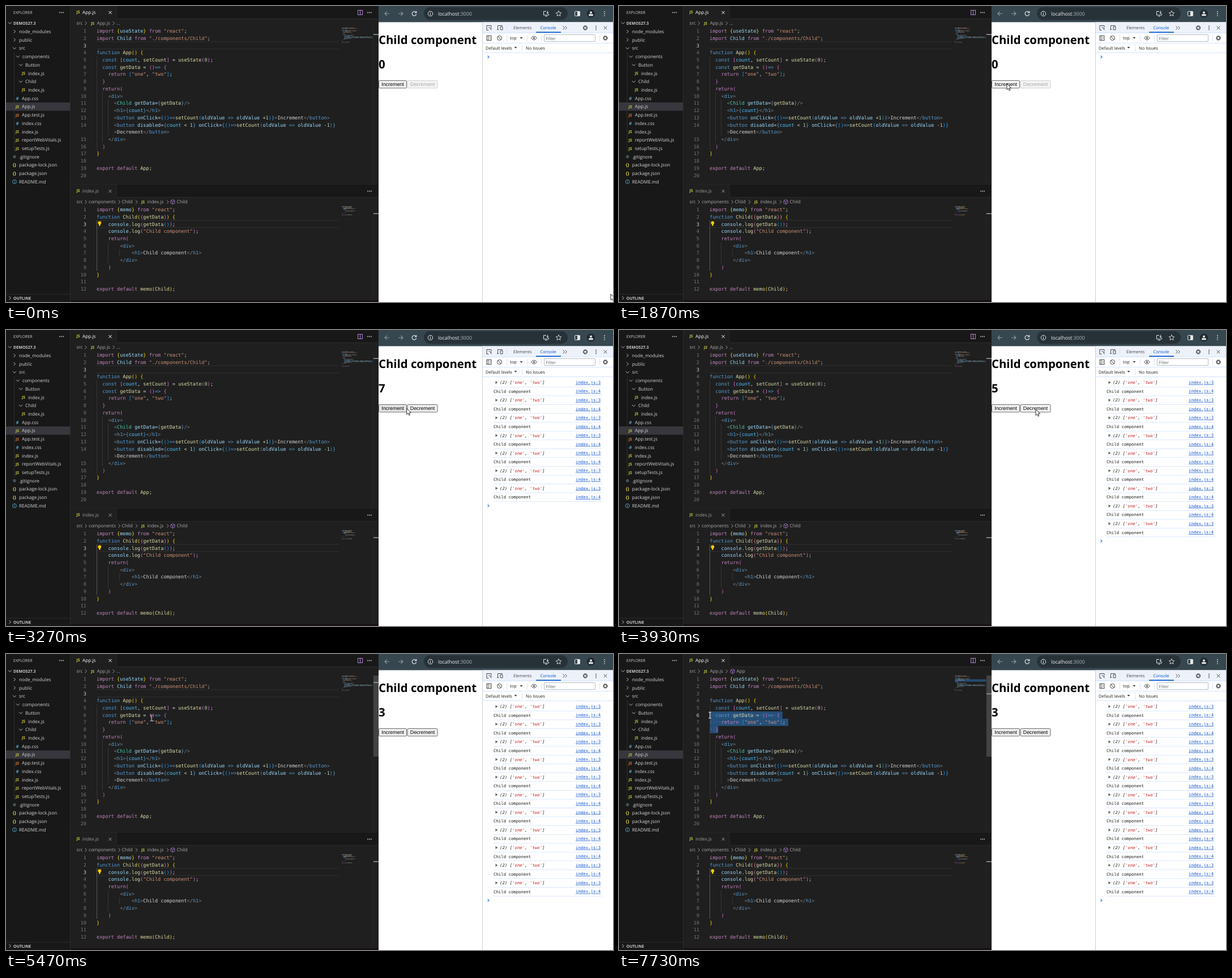
An HTML page that plays this animation: 1072x522 px, repeating every 8 s.

```html
<!DOCTYPE html>
<html lang="en">
<head>
<meta charset="utf-8">
<title>Editor and browser</title>
<style>
html, body { margin: 0; width: 100%; height: 100%; overflow: hidden; background: #1f1f1f; }
svg { display: block; width: 1072px; height: 522px; text-rendering: geometricPrecision; }
text { white-space: pre; font-family: "Open Sans", "Noto Sans", sans-serif; }
.mono { font-family: "DejaVu Sans Mono", "Noto Sans Mono", monospace; }
.arial { font-family: "Liberation Sans", sans-serif; }
</style>
</head>
<body>
<svg id="stage" viewBox="0 0 1072 522" xmlns="http://www.w3.org/2000/svg"></svg>
<script>
const LOOP = 8000, CHAR = 5.148, LEAD = 12.73, CODE_X = 160;
const TOP = 44, BOTTOM = 359;
const COLORS = { p: '#c586c0', b: '#569cd6', v: '#9cdcfe', f: '#dcdcaa', s: '#ce9178', t: '#4ec9b0',
  n: '#b5cea8', g: '#808080', w: '#d4d4d4', c: '#4fc1ff', 1: '#ffd700', 2: '#da70d6', 3: '#179fff' };

// Each segment between "~" starts with its colour key.
const appCode = [
  'pimport ~1{~vuseState~1}~p from ~s"react"~w;',
  'pimport ~vChild~p from ~s"./components/Child"~w;',
  '',
  'bfunction ~fApp~1() {',
  'b  const ~2[~ccount~w, ~fsetCount~2]~w = ~fuseState~2(~n0~2)~w;',
  'b  const ~fgetData~w = ~2()~b=>~2 {',
  'p    return ~3[~s"one"~w, ~s"two"~3]~w;',
  '2  }',
  'p  return~2(',
  'g    <~bdiv~g>',
  'g      <~tChild~v getData~w=~b{~fgetData~b}~g/>',
  'g      <~bh1~g>~b{~ccount~b}~g</~bh1~g>',
  'g      <~bbutton~v onClick~w=~b{~3()~b=>~fsetCount~3(~voldValue~b => ~voldValue ~w+~n1~3)~b}~g>~wIncrement~g</~bbutton~g>',
  'g      <~bbutton~v disabled~w=~b{~ccount~w < ~n1~b}~v onClick~w=~b{~3()~b=>~fsetCount~3(~voldValue~b => ~voldValue ~w-~n1~3)~b}',
  'g      >~wDecrement~g</~bbutton~g>',
  'g    </~bdiv~g>',
  '2  )',
  '1}',
  '',
  'pexport default ~fApp~w;',
  ''
];
const childCode = [
  'pimport ~1{~vmemo~1}~p from ~s"react"~w;',
  'bfunction ~fChild~1(~2{~fgetData~2}~1) {',
  'v    console~w.~flog~2(~fgetData~3()~2)~w;',
  'v    console~w.~flog~2(~s"Child component"~2)~w;',
  'p    return~2(',
  'g        <~bdiv~g>',
  'g            <~bh1~g>~wChild component~g</~bh1~g>',
  'g        </~bdiv~g>',
  '2    )',
  '1}',
  '',
  'pexport default ~fmemo~1(~fChild~1)~w;'
];
const files = [
  ['>', 15, 'node_modules'], ['>', 15, 'public'], ['v', 15, 'src'], ['v', 21, 'components'],
  ['v', 26, 'Button'], ['JS', 31, 'index.js'], ['v', 26, 'Child'], ['JS', 31, 'index.js'],
  ['#', 20, 'App.css'], ['JS', 20, 'App.js'], ['JS', 20, 'App.test.js', '#e37933'], ['#', 20, 'index.css'],
  ['JS', 20, 'index.js'], ['JS', 20, 'reportWebVitals.js'], ['JS', 20, 'setupTests.js'],
  ['o', 15, '.gitignore'], ['{}', 15, 'package-lock.json'], ['{}', 15, 'package.json'], ['i', 15, 'README.md']
];

const esc = s => s.replace(/&/g, '&amp;').replace(/</g, '&lt;');
const rect = (x, y, w, h, fill, more = '') => `<rect x="${x}" y="${y}" width="${w}" height="${h}" fill="${fill}" ${more}/>`;
const line = (d, stroke, width = 1, more = '') => `<path d="${d}" fill="none" stroke="${stroke}" stroke-width="${width}" ${more}/>`;
const circle = (x, y, r, fill, more = '') => `<circle cx="${x}" cy="${y}" r="${r}" fill="${fill}" ${more}/>`;
const text = (x, y, s, fill, size = 8.2, more = '') =>
  `<text x="${x}" y="${(y + size * .36).toFixed(2)}" fill="${fill}" font-size="${size}" ${more}>${esc(s)}</text>`;
const code = (x, y, s, fill, more = '') => text(x, y, s, fill, 8.55, 'class="mono" ' + more);
const log = (x, y, s, fill, more = '') => text(x, y, s, fill, 7.33, 'class="mono" ' + more);
const chevron = (x, y, open, color = '#ccc') =>
  line(open ? `M${x - 3} ${y - 1.5}l3 3 3-3` : `M${x - 1.5} ${y - 3}l3 3-3 3`, color, .9);
const cross = (x, y, color, r = 2.6) => line(`M${x - r} ${y - r}l${2 * r} ${2 * r}m0 ${-2 * r}l${-2 * r} ${2 * r}`, color, 1);
const dots = (x, y, color, dx, dy) => [-1, 0, 1].map(k => circle(x + k * dx, y + k * dy, .9, color)).join('');
const js = (x, y, color = '#cbcb41') => text(x, y, 'JS', color, 6.8, 'font-weight="700" text-anchor="middle"');
const cube = (x, y) => line(`M${x} ${y - 4}l3.5 1.8v4.2l-3.5 2-3.5-2v-4.2zM${x - 3.5} ${y - 2.2}l3.5 1.9 3.5-1.9M${x} ${y - .3}v4.2`, '#b180d7', .8);
const gear = (x, y) => circle(x, y, 3.4, 'none', 'stroke="#45474a" stroke-width="1.6" stroke-dasharray="1.9 .77"') +
  circle(x, y, 2.4, 'none', 'stroke="#45474a"');
const rowY = (top, row) => top + row * LEAD;
const plain = src => src.split('~').map(s => s.slice(1)).join('');

function codeBlock(lines, top, mapTop) {
  let out = '', map = '';
  lines.forEach((src, row) => {
    let col = 0;
    for (const seg of src.split('~')) {
      const color = COLORS[seg[0]], s = seg.slice(1);
      out += s.trim() && code(CODE_X + col * CHAR, rowY(top, row), s, color);
      for (const m of s.matchAll(/\S+/g))
        map += rect(593 + (col + m.index) * .67, mapTop + row * 1.34, m[0].length * .67, .9, color);
      col += s.length;
    }
  });
  return out + `<g opacity=".5">${map}</g>`;
}

function lineNumbers(count, top, active, wrapAfter) {
  let out = '';
  for (let n = 1; n <= count; n++)
    out += code(142, rowY(top, n - 1 + (n > wrapAfter)), String(n), n === active ? '#ccc' : '#6e7681', 'text-anchor="end"');
  return out;
}

const guide = (x, top, from, to, color = '#404040') =>
  line(`M${x + .5} ${rowY(top, from - .5)}V${rowY(top, to + .5)}`, color, .7);
const lineBox = (top, row) =>
  line(`M160 ${rowY(top, row - .5)}H588M160 ${rowY(top, row + .5)}H588`, '#303031', 1);

function fileIcon(kind, x, y, color) {
  if (kind === '>' || kind === 'v') return chevron(x, y, kind === 'v');
  if (kind === 'JS') return js(x, y, color);
  if (kind === 'o') return circle(x, y, 2.8, '#41535b');
  if (kind === 'i') return circle(x, y, 3.5, 'none', 'stroke="#519aba"') + line(`M${x} ${y - .5}v2.6m0-4.6v1`, '#519aba', 1);
  return text(x, y, kind, kind === '#' ? '#519aba' : '#cbcb41', 8, 'font-weight="700" text-anchor="middle"');
}

function sidebar() {
  let out = rect(0, 0, 113, 522, '#181818') + rect(0, 170, 113, 14.7, '#37373d') + rect(113, 0, 1, 522, '#2b2b2b') +
    text(13, 11, 'EXPLORER', '#ccc', 7) + dots(98, 11.5, '#ccc', 3, 0) +
    chevron(7, 30, true) + text(13, 30, 'DEMOS27.3', '#ccc', 7.1, 'font-weight="700"') +
    line('M14.5 82V258', '#3a3a3a', .7) + rect(0, 508, 113, 1, '#2b2b2b') +
    chevron(7, 515, false) + text(13, 515, 'OUTLINE', '#ccc', 7.1, 'font-weight="700"');
  files.forEach(([kind, x, name, color], i) => {
    const y = 45 + i * 14.72;
    out += fileIcon(kind, x, y, color) + text(x + 8, y, name, '#d4d4d4');
  });
  return out;
}

function editorChrome() {
  const crumb = '#a9a9a9';
  const tabBar = (y, name, color) => rect(114, y, 543, 22, '#181818') + rect(114, y + 22, 543, 1, '#2b2b2b') +
    rect(114, y, 81, 23, '#1f1f1f') + rect(194.5, y, 1, 22, '#2b2b2b') + js(127.5, y + 11) +
    text(135, y + 11, name, color) + cross(184, y + 11.5, color) + dots(642, y + 11.5, '#ccc', 3, 0);
  return rect(114, 0, 544, 522, '#1f1f1f') + tabBar(0, 'App.js', '#fff') + rect(114, 314.5, 543, 1, '#2b2b2b') +
    tabBar(315, 'index.js', '#9d9d9d') + rect(114, 519, 543, 3, '#170f14') +
    rect(621.5, 7.5, 8, 8, 'none', 'stroke="#b180d7"') + line('M625.5 7.5v8', '#b180d7') +
    text(124.5, 30, 'src', crumb) + chevron(141, 30.5, false, crumb) + js(153, 30.5) + text(160.5, 30, 'App.js', crumb) +
    chevron(190, 30.5, false, crumb) +
    text(124.5, 345, 'src', crumb) + chevron(141, 345.5, false, crumb) + text(146, 345, 'components', crumb) +
    chevron(200, 345.5, false, crumb) + text(204.5, 345, 'Child', crumb) + chevron(230.5, 345.5, false, crumb) +
    js(242, 345.5) + text(249.5, 345, 'index.js', crumb) + chevron(285.5, 345.5, false, crumb) + cube(294.5, 345.5) +
    text(301.5, 345, 'Child', crumb);
}

function browser() {
  const light = '#e3e6e8', dim = '#8b999f', ink = '#45474a', rule = '#d3e3fd', dark = '#1f1f1f';
  const arrow = (x, dir, color) => line(`M${x - 4 * dir} 13.5h${8 * dir}m${-3.5 * dir}-3.5l${3.5 * dir} 3.5 ${-3.5 * dir} 3.5`, color, 1.1);
  const caret = (x, y) => `<path d="M${x - 2.5} ${y - 1.3}h5l-2.5 3z" fill="${ink}"/>`;
  return rect(658, 0, 414, 522, '#fff') + rect(658, 0, 414, 28.5, '#37474f') +
    rect(738, 2, 254, 22.5, '#273238', 'rx="11.2"') +
    arrow(673, -1, dim) + arrow(697, 1, dim) +
    line('M724 11.2A3.8 3.8 0 1 0 724.6 14.5M724.8 9v3h-3', light, 1.2) +
    circle(749.5, 13.5, 4.2, 'none', `stroke="${light}"`) + line('M749.5 12.8v3.2m0-5.3v1.1', light, 1.1) +
    `<text x="763" y="16.7" font-size="8.9" fill="#f1f3f4">localhost<tspan fill="#a9b3b8">:3000</tspan></text>` +
    line('M954 9.5h-4.5v6.5h9v-2M952 18h4M956.5 8.5v5m-2-2l2 2 2-2', light, 1) +
    line('M976 8.5l1.4 3.2 3.4.3-2.6 2.3.8 3.4-3-1.8-3 1.8.8-3.4-2.6-2.3 3.4-.3z', light, .9) +
    rect(1004.5, 9.5, 9, 8, 'none', `stroke="${light}" rx="1"`) + rect(1009, 9.5, 4.5, 8, light) +
    circle(1033, 13.5, 7.2, '#202a2f') + circle(1033, 11.5, 2, light) + rect(1029, 14.2, 8, 3.3, light, 'rx="1.6"') +
    dots(1057, 13.5, light, 0, 3.6) +
    text(658, 59.6, 'Child component', '#000', 20.35, 'font-weight="700"') +
    // developer tools
    rect(841, 28.5, 231, 19, '#edf2fa') + rect(841, 28.5, 1, 493.5, '#c8cfd8') +
    rect(842, 47, 230, 1, rule) + rect(842, 65, 230, 1, rule) + rect(842, 82, 230, 1, rule) +
    line('M852.5 42.5h-3.5v-8h8v3M852.5 37.5l5 2-2 .8 2 2.2', ink, 1) +
    line('M870 41.5h-3M868.5 41v-6.5h8.5M873 36.5h4v5.5h-4z', ink, 1) + rect(884, 33, 1, 11, rule) +
    text(896, 38.5, 'Elements', ink, 7.5) + text(943.5, 38.5, 'Console', '#0b57d0', 7.5) + rect(936, 45.5, 44, 1.7, '#0b57d0') +
    line('M983.5 35.5l3 3-3 3m4-6l3 3-3 3', ink, 1) + gear(1023, 38.5) + dots(1042, 38.5, ink, 0, 3) + cross(1058.5, 38.5, ink, 2.8) +
    rect(849, 52.5, 8, 8, 'none', `stroke="${ink}"`) + line('M851.5 52.5v8M853.5 54.8l1.8 1.7-1.8 1.7', ink, .9) +
    circle(871.5, 56.5, 4, 'none', `stroke="${ink}"`) + line('M868.7 53.7l5.6 5.6', ink) +
    rect(884, 51, 1, 11, rule) + text(890, 56.5, 'top', dark, 7.5) + caret(910, 56.3) + rect(920, 51, 1, 11, rule) +
    line('M927.5 56.5q5-6.5 10 0q-5 6.5-10 0z', ink, 1) + circle(932.5, 56.5, 1.5, ink) + rect(945, 51, 1, 11, rule) +
    rect(950.5, 50.5, 90, 12, '#fff', 'stroke="#b4bac3" rx="1.5"') + text(953.5, 57, 'Filter', '#5f6368', 7.5) +
    rect(1048, 51, 1, 11, rule) + gear(1058.5, 56.5) +
    text(847, 74, 'Default levels', dark, 7.5) + caret(900, 73.3) + rect(911, 69, 1, 11, rule) +
    text(918, 74, 'No Issues', dark, 7.5);
}

document.getElementById('stage').innerHTML =
  sidebar() + editorChrome() + '<g id="under"></g>' +
  guide(160, TOP, 4, 16) + guide(170, TOP, 9, 15) + guide(180, TOP, 10, 14) +
  lineBox(BOTTOM, 2) + guide(160, BOTTOM, 2, 8, '#707070') + guide(180, BOTTOM, 5, 7) + guide(200, BOTTOM, 6, 6) +
  codeBlock(appCode, TOP, 38) + codeBlock(childCode, BOTTOM, 353) + lineNumbers(12, BOTTOM, 3, 99) +
  circle(165.3, 382.3, 2.9, '#ffcc00') + rect(164, 385, 2.6, 2.6, '#ffcc00') +
  line('M648.5 37V314M648.5 352V519', '#2b2b2b', .7) + rect(649, 365.5, 9, 1.5, '#a0a0a0') +
  browser() + '<g id="over"></g>';

// Button presses as [press, release]; the count changes on release.
const incPresses = [1870, 2050, 2230, 2400, 2570, 2760, 2950].map(t => [t, t + 90]);
const decPresses = [[3530, 3600], [3730, 3870], [3930, 4000], [4070, 4130]];
const path = [[70, 1068, 508], [500, 430, 280], [870, 720, 204], [1100, 827, 185], [1530, 685, 137], [3100, 685, 137],
  [3470, 736, 140], [4130, 736, 140], [4330, 696, 202], [4600, 696, 202], [5150, 238, 121], [5400, 257, 113],
  [5470, 257, 113], [5700, 294, 116], [6000, 196, 126], [6270, 252, 132], [6330, 252, 132], [6730, 205.5, 131],
  [6870, 205.5, 131], [7060, 176, 133], [7200, 176, 133], [7670, 168, 110], [7730, 160.5, 108]];
const sliderFade = [[300, 0], [380, 1], [950, 1], [1500, 0], [4640, 0], [4720, 1]];
const DRAG_START = 7060;

function sample(keys, t) {
  if (t <= keys[0][0]) return keys[0].slice(1);
  const i = keys.findIndex(k => k[0] > t);
  if (i < 0) return keys.at(-1).slice(1);
  const [a, b] = [keys[i - 1], keys[i]], u = (t - a[0]) / (b[0] - a[0]), e = u * u * (3 - 2 * u);
  return a.slice(1).map((v, k) => v + (b[k + 1] - v) * e);
}

function pointer(x, y) {
  if (x > 657) return `<path d="M${x} ${y}v10.6l2.5-2.3 1.7 3.9 1.7-.8-1.7-3.8h3.4z" fill="#fff" stroke="#000" stroke-width=".8"/>`;
  return line(`M${x - 2.5} ${y - 5}h2l.5.5.5-.5h2M${x} ${y - 4.5}v9M${x - 2.5} ${y + 5}h2l.5-.5.5.5h2`, '#e8e8e8', 1);
}

function selection(row, col) {
  const endRow = 7, endCol = 3;
  let out = '';
  for (let r = row; r <= endRow; r++) {
    const s = plain(appCode[r]), from = r === row ? col : 0, to = r === endRow ? endCol : s.length + 1;
    if (to <= from) continue;
    const x = CODE_X + from * CHAR;
    const spaces = s.slice(from).replace(/./g, c => c === ' ' ? '·' : ' ');
    out += rect(x, rowY(TOP, r - .5), (to - from) * CHAR, LEAD + .1, '#264f78') +
      code(x, rowY(TOP, r), spaces, '#6f89a3') + rect(593, 38 + r * 1.34, 55, 1.4, '#264f78');
  }
  return out;
}

function button(x, w, label, enabled, hover, down) {
  const fill = !enabled ? '#f4f4f4' : down ? '#f5f5f5' : hover ? '#e5e5e5' : '#efefef';
  return rect(x, 131.5, w, 13.3, fill, `rx="1.6" stroke="${enabled ? '#6b6b6b' : '#d0d0d0'}"`) +
    text(x + w / 2, 138.1, label, enabled ? '#000' : '#a8a8a8', 8.92, 'class="arial" text-anchor="middle"');
}

function consoleRows(renders) {
  const italic = 'font-style="italic"';
  let out = '';
  for (let i = 0; i < renders * 2; i++) {
    const y = 92.6 + i * 15.55;
    out += i % 2
      ? log(861, y, 'Child component', '#1f1f1f')
      : `<path d="M864.5 ${y - 2.6}l4 2.6-4 2.6z" fill="#5f6368"/>` +
        log(872, y, '(2) [', '#1f1f1f', italic) + log(894.1, y, "'one'", '#c5221f', italic) +
        log(916.2, y, ',', '#1f1f1f', italic) + log(925, y, "'two'", '#c5221f', italic) +
        log(947.1, y, ']', '#1f1f1f', italic);
    out += log(1006, y - .3, 'index.js:' + (3 + i % 2), '#1155cc', 'text-decoration="underline"') +
      rect(861, y + 7.5, 192, .8, '#d3e3fd');
  }
  const y = renders ? 92.4 + renders * 31.1 : 90;
  return out + line(`M850.5 ${y - 2.3}l2.6 2.3-2.6 2.3`, '#367cf1', 1.2);
}

const under = document.getElementById('under'), over = document.getElementById('over');

function draw(t) {
  const [x, y] = sample(path, t), [slider] = sample(sliderFade, t);
  const done = list => list.filter(p => t >= p[1]).length, held = list => list.some(p => t >= p[0] && t < p[1]);
  const ups = done(incPresses), downs = done(decPresses), count = ups - downs;
  const hovers = (left, right) => x > left && x < right && y > 131 && y < 145;
  const clicked = t >= DRAG_START;
  const row = clicked ? Math.min(7, Math.round((y - TOP) / LEAD)) : 2;
  const col = Math.min(3, Math.max(0, Math.round((x - CODE_X) / CHAR)));
  const selected = clicked && (row < 7 || col < 3);

  under.innerHTML = (selected ? selection(row, col) : lineBox(TOP, row)) + lineNumbers(20, TOP, row + 1, 14) +
    (clicked ? cube(200.5, 30.5) + text(207.5, 30, 'App', '#a9a9a9') : text(195, 30, '...', '#a9a9a9'));
  over.innerHTML = rect(649, 38, 9, 143, '#797979', `opacity="${.4 * slider}"`) +
    rect(649, 49.5 + (row - 2) * 6.7, 9, 1.5, '#a0a0a0') +
    (clicked ? rect(CODE_X + col * CHAR, rowY(TOP, row - .5), 1.2, LEAD, '#aeafad') : '') +
    text(658, 102.7, String(count), '#000', 20.35, 'font-weight="700"') +
    button(658.5, 49, 'Increment', true, hovers(657, 708), held(incPresses)) +
    button(709, 53, 'Decrement', count > 0, hovers(708, 762), held(decPresses)) +
    consoleRows(ups + downs) + pointer(x, y);
}

function tick() {
  draw(performance.now() % LOOP);
  requestAnimationFrame(tick);
}
tick();
</script>
</body>
</html>
```
